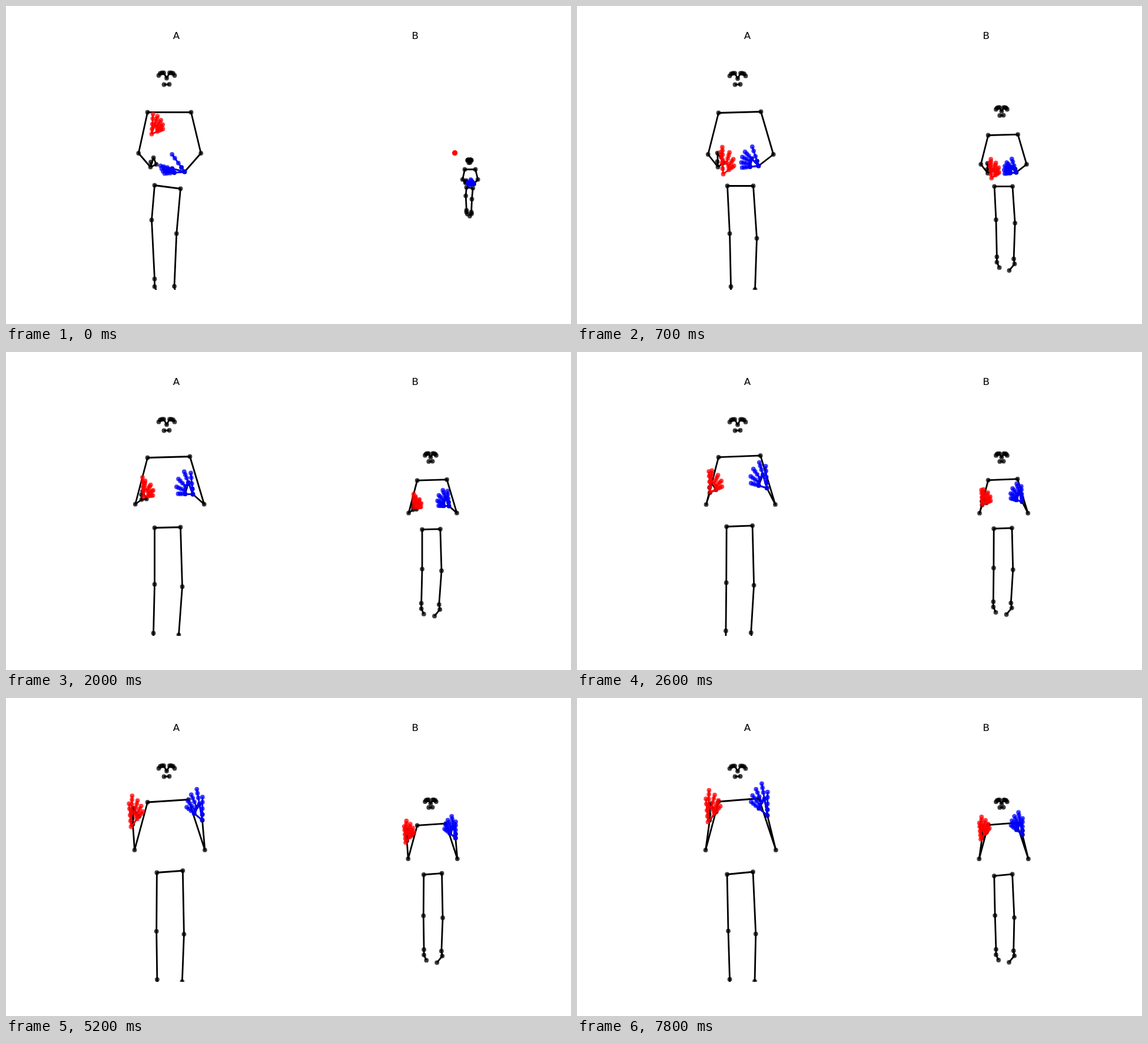
Write an HTML page with a canvas that moves like this. It is 960 by 540 pixels and loops after 8000 ms.

```html
<!DOCTYPE html>
<html lang="en">
<head>
<meta charset="utf-8">
<title>Pose comparison</title>
<style>
  html, body { margin: 0; width: 100%; height: 100%; overflow: hidden; background: #fff; }
  canvas { display: block; }
</style>
</head>
<body>
<canvas id="stage" width="960" height="540"></canvas>
<script>
const ctx = document.getElementById('stage').getContext('2d');
const LOOP = 8000, INTRO = 700, FLOOR = 482;
const SETTLE_FROM = 12, SETTLE_STEPS = 6;

// shoulder: [y, tilt], elbow: [distance from the middle, y],
// hip, knee, ankle: right leg; the left leg follows, offset by stagger.
// hands: [wrist x, wrist y, index angle, little finger angle, index length, little finger length]
const keyPoses = [
  { step: 0, shoulder: [180, 0], elbow: [53, 249.5], wrist: [245, 273],
    hip: [252, 304], knee: [247, 363], ankle: [252, 463], stagger: [23],
    right: [247, 217, 18, 65, 32, 21], left: [303, 281, 76, 95, 42, 34] },
  { step: 7, shoulder: [181, 2], elbow: [55.5, 251.5], wrist: [239, 273],
    hip: [255, 305], knee: [259, 386], ankle: [261, 476], stagger: [8],
    right: [248, 285, -2, 52, 46, 23], left: [308, 271, 44, 96, 33, 28] },
  { step: 9, shoulder: [179, 2], elbow: [58.5, 258], wrist: [230, 250],
    hip: [252, 298], knee: [252, 394], ankle: [250, 477], stagger: [4],
    right: [233, 245, 6, 83, 27, 16], left: [317, 241, 21, 88, 41, 25] },
  { step: SETTLE_FROM, shoulder: [177, 4], elbow: [59, 259], wrist: [218, 221],
    hip: [256, 293], knee: [255, 387], ankle: [256, 467], stagger: [5],
    right: [215, 226, 2, 38, 51, 31], left: [330, 215, 10, 50, 52, 33] }
];

const mix = (a, b, k) => a + (b - a) * k;
const mixPoint = (p, q, k) => [mix(p[0], q[0], k), mix(p[1], q[1], k)];
const shift = ([x, y], dx, dy) => [x + dx, y + dy];
const easeOut = k => k * (1.3 - .3 * k);

// The picture holds still between steps: 100 ms at first, then about 650 ms.
function stepAt(time) {
  const tick = Math.floor(time / 100) * 100;
  return time < INTRO ? tick / 100 : 7 + Math.floor((tick + 99 - INTRO) / 650);
}

function poseAt(step) {
  const next = keyPoses.findIndex(key => key.step > step);
  if (next < 0) return settle(keyPoses.at(-1), (step - SETTLE_FROM) / SETTLE_STEPS);
  const from = keyPoses[next - 1], to = keyPoses[next];
  const k = easeOut((step - from.step) / (to.step - from.step));
  const pose = {};
  for (const part in from) {
    if (part !== 'step') pose[part] = from[part].map((v, n) => mix(v, to[part][n], k));
  }
  return pose;
}

// With the hands up, the body dips and recovers while the arms rise and close in.
function settle(pose, u) {
  const dip = Math.sin(2.4 * u), rise = Math.sin(u * Math.PI / 2);
  const inward = 24 * u * u - 17 * u, drift = 3 * u * u;
  const moveHand = ([x, y, a, b, long, short], dx) =>
    [x + dx, y - 16 * rise, a, b, long + 3 * rise, short + 3 * rise];
  return {
    ...pose,
    shoulder: shift(pose.shoulder, -1.5 * u, 1.5 * u),
    elbow: shift(pose.elbow, dip, -2 * dip),
    wrist: shift(pose.wrist, inward, -14 * rise),
    hip: shift(pose.hip, -drift / 2, 6 * rise),
    knee: shift(pose.knee, drift / 2, 12 * dip),
    ankle: shift(pose.ankle, drift, 15 * dip),
    right: moveHand(pose.right, inward),
    left: moveHand(pose.left, -inward)
  };
}

// Fingers fan out from the wrist; side is 1 or -1 for the mirrored hand.
function buildHand([x, y, indexAngle, littleAngle, indexLength, littleLength], side) {
  const wrist = [x, y];
  const ray = (degrees, length) => {
    const a = degrees * Math.PI / 180;
    return k => shift(wrist, side * Math.sin(a) * length * k, -Math.cos(a) * length * k);
  };
  const thumbRay = ray(.55 * indexAngle - 6, 26 + indexLength / 4);
  const thumb = [0, .25, .5, .78, 1].map(thumbRay);
  const fingers = [0, 1, 2, 3].map(n => {
    const finger = ray(mix(indexAngle, littleAngle, n / 3), mix(indexLength, littleLength, n / 3));
    return [.52, .72, .87, 1].map(finger);
  });
  const knuckles = fingers.map(finger => finger[0]);
  return { wrist, thumb, knuckles, chains: [thumb, [wrist, ...knuckles, wrist], ...fingers] };
}

function palmChains(wrist, hand) {
  const attach = p => shift(wrist, p[0] - hand.wrist[0], p[1] - hand.wrist[1]);
  const [index, little, thumb] = [hand.knuckles[0], hand.knuckles[3], hand.thumb[1]].map(attach);
  return [[wrist, little, index, wrist], [wrist, thumb]];
}

function faceChains(y) {
  const middle = 272.5;
  const eye = side => [5, 8, 11, 13.5].map((d, n) => [middle + side * d, y + [0, 0, 1, 4.5][n]]);
  return [
    [...eye(-1).reverse(), [middle, y + 9], ...eye(1)],
    [[middle - 4.5, 133], [middle + 4.5, 132.5]]
  ];
}

function bodyChains(pose, right, left) {
  const { hip, knee, ankle, wrist } = pose;
  const [shoulderY, tilt] = pose.shoulder, [flare, elbowY] = pose.elbow, [stagger] = pose.stagger;
  const leftHip = shift(hip, 44, stagger / 4 - tilt);
  const leftKnee = shift(knee, 48 - stagger / 4, stagger);
  const leftAnkle = shift(ankle, 45 - stagger / 2, stagger / 2 + 1);
  return [
    ...faceChains(113 + tilt / 3),
    [wrist, [277.7 - flare, elbowY], [240, shoulderY],
      [314 - tilt, shoulderY - tilt], [277.7 + flare, elbowY], left.wrist],
    ...palmChains(wrist, right),
    ...palmChains(left.wrist, left),
    [shift(ankle, 6, 26), shift(ankle, 0, 13), ankle, knee, hip,
      leftHip, leftKnee, leftAnkle, shift(leftAnkle, 2, 12), shift(leftAnkle, -11, 28)]
  ];
}

function drawChains(chains, color, { scale, x, y }) {
  const placed = chains.map(chain => chain.map(p => [p[0] * scale + x, p[1] * scale + y]));
  ctx.strokeStyle = ctx.fillStyle = color;
  ctx.beginPath();
  for (const chain of placed) chain.forEach((p, n) => n ? ctx.lineTo(...p) : ctx.moveTo(...p));
  ctx.stroke();

  // Joints shared by several chains get a single dot.
  const joints = new Map(placed.flat().map(p => [p.join(), p]));
  ctx.globalAlpha = .75;
  for (const [px, py] of joints.values()) {
    ctx.beginPath();
    ctx.arc(px, py, 3.9, 0, 2 * Math.PI);
    ctx.fill();
  }
  ctx.globalAlpha = 1;
}

function drawFigure(pose, view, rightView = view) {
  const right = buildHand(pose.right, 1), left = buildHand(pose.left, -1);
  drawChains(bodyChains(pose, right, left), '#000', view);
  drawChains(right.chains, '#f00', rightView);
  drawChains(left.chains, '#00f', view);
}

const plain = { scale: 1, x: 0, y: 0 };
const settled = { scale: .7, x: 530.2, y: 92.3 };
const distant = { scale: .245, x: 720.2, y: 232.9 };
const speck = { scale: .02, x: 757, y: 245 };
const mixView = (a, b, k) => ({ scale: mix(a.scale, b.scale, k), x: mix(a.x, b.x, k), y: mix(a.y, b.y, k) });

function draw(now) {
  const step = stepAt(now % LOOP);
  const pose = poseAt(step);
  const arrival = Math.min(step / 7, 1);

  ctx.fillStyle = '#fff';
  ctx.fillRect(0, 0, 960, 540);
  ctx.fillStyle = '#000';
  ctx.font = '16.67px "DejaVu Sans", sans-serif';
  ctx.textAlign = 'center';
  ctx.fillText('A', 289.5, 56);
  ctx.fillText('B', 695.3, 56);

  ctx.save();
  ctx.beginPath();
  ctx.rect(0, 0, 960, FLOOR);
  ctx.clip();
  ctx.translate(.5, .5);
  ctx.lineWidth = 2.8;
  ctx.lineJoin = 'round';
  drawFigure(pose, plain);
  drawFigure(pose, mixView(distant, settled, arrival), mixView(speck, settled, arrival));
  ctx.restore();
  requestAnimationFrame(draw);
}
requestAnimationFrame(draw);
</script>
</body>
</html>
```
